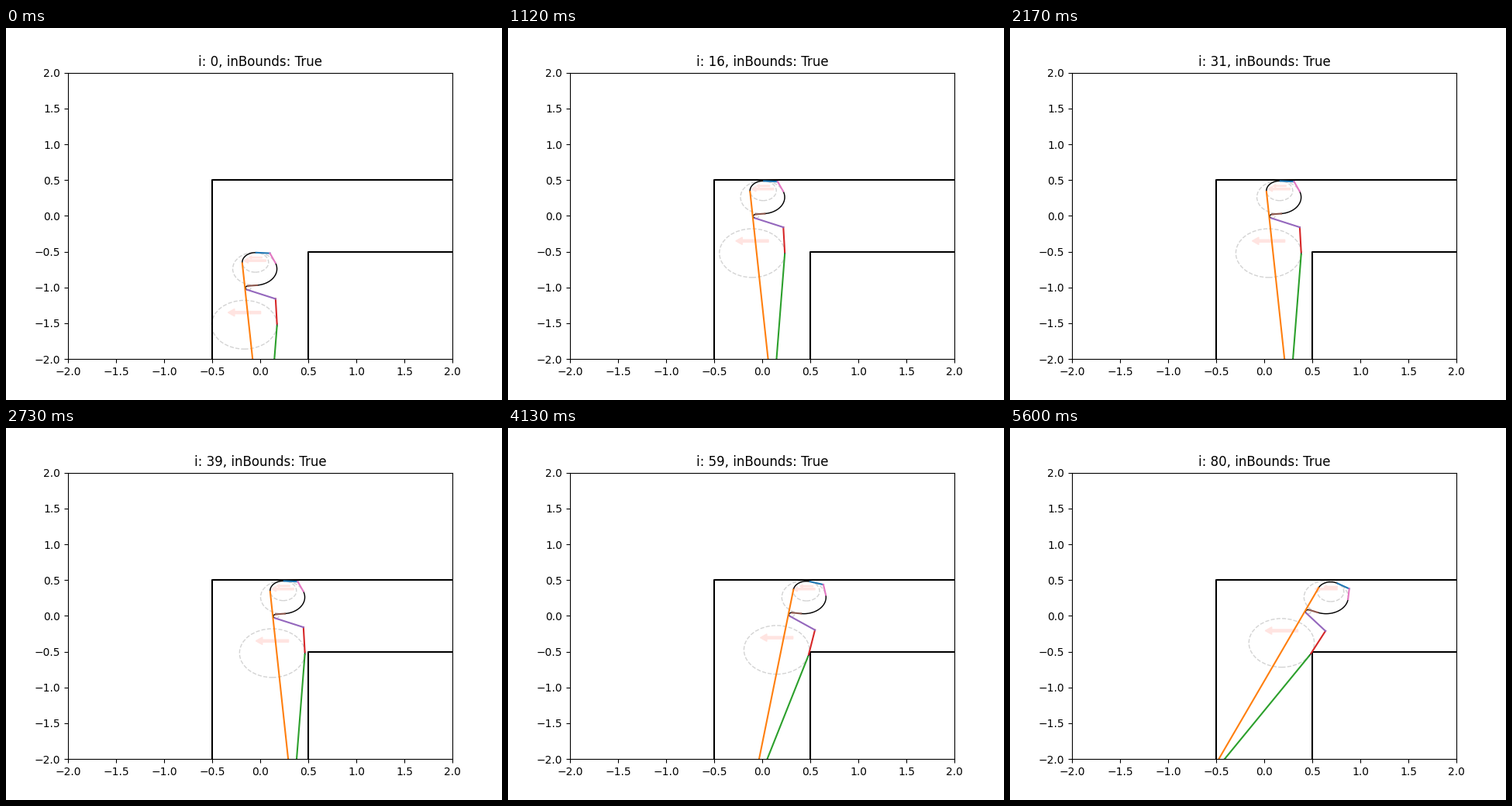
Animation, 640 px wide and 480 px high, one loop 5.67 s. Source, as a matplotlib script:

```python
import numpy as np
import matplotlib.pyplot as plt
from matplotlib.animation import FuncAnimation
from matplotlib.patches import Circle, Polygon

FRAMES, INTERVAL = 81, 70
CORNER = np.array([0.5, -0.5])

# Body geometry at the start pose; the body turns about HEAD.
HEAD, HEAD_R = np.array([-0.056, -0.74]), 0.23
CAP, CAP_R = np.array([-0.05, -0.65]), 0.137
NOTCH, NOTCH_R = np.array([-0.125, -1.006]), 0.028
BASE, BASE_R = np.array([-0.165, -1.52]), 0.34
TOP_TIP = np.array([0.101, -0.522])
SIDE_TIP = np.array([0.16, -1.159])


def on_circle(center, r, deg):
    a = np.radians(deg)
    return center + r * np.stack([np.cos(a), np.sin(a)], axis=-1)


def arc(center, r, start, end):
    return on_circle(center, r, np.linspace(start, end, 60))


def pose(i):
    """Pivot position and clockwise turn at step i."""
    pivot = HEAD + [0.01 * max(i - 10, 0), 0.1 * min(i, 10)]
    if i <= 10:
        return pivot, 0.0
    dx, dy = CORNER - pivot
    # smallest turn, in steps of 0.01, that clears the inner corner
    need = np.arcsin(0.2305 / np.hypot(dx, dy)) - np.arctan2(dx, -dy)
    return pivot, max(0.0, np.ceil(need * 100) / 100)


def place(points, pivot, turn):
    c, s = np.cos(turn), np.sin(turn)
    return (points - HEAD) @ np.array([[c, -s], [s, c]]) + pivot


def arrow(center, r):
    """Left-pointing arrow in the upper half of a circle."""
    x = np.array([0, 0, 0.8, 0.8, 1, 0.8, 0.8])
    y = np.array([0.1, -0.1, -0.1, -0.3, 0, 0.3, 0.1])
    return center + np.column_stack([r / 2 - r * x, r / 2 + r / 2 * y])


CAP_LEFT = on_circle(CAP, CAP_R, 184.6)
BASE_RIGHT = on_circle(BASE, BASE_R, -3.35)
edges = [
    [on_circle(CAP, CAP_R, 87), TOP_TIP],
    [CAP_LEFT, CAP_LEFT + 4 * np.array([0.0803, -1])],
    [BASE_RIGHT + 3 * np.array([-0.0585, -1]), BASE_RIGHT],
    [on_circle(BASE, BASE_R, 2.5), SIDE_TIP],
    [SIDE_TIP, on_circle(NOTCH, NOTCH_R, 246)],
    [on_circle(NOTCH, NOTCH_R, 96), on_circle(HEAD, HEAD_R, -84.3)],
    [TOP_TIP, on_circle(HEAD, HEAD_R, 21)],
]
edges = [np.array(e) for e in edges]
arcs = [
    arc(CAP, CAP_R, 87, 184.6),
    arc(HEAD, HEAD_R, 21, -84.3),
    arc(NOTCH, NOTCH_R, 96, 246),
    arc(BASE, BASE_R, -3.35, 2.5),
]
circles = [(BASE, BASE_R), (HEAD, HEAD_R), (CAP, CAP_R), (NOTCH, NOTCH_R)]

fig, ax = plt.subplots(figsize=(6.4, 4.8), dpi=100)
ax.set_xlim(-2, 2)
ax.set_ylim(-2, 2)
title = ax.set_title("")

ax.plot([-0.5, -0.5, 2], [-2, 0.5, 0.5], color="black")
ax.plot([0.5, 0.5, 2], [-2, -0.5, -0.5], color="black")

rings, arrows = [], []
for center, r in circles:
    rings.append(ax.add_patch(Circle(center, r, fill=False, ls="--", lw=1,
                                     ec="lightgrey")))
    arrows.append(ax.add_patch(Polygon(arrow(center, r), closed=True, lw=1,
                                       color="mistyrose")))
curves = [ax.plot([], [], color="black", lw=1, zorder=1.5)[0] for _ in arcs]
lines = [ax.plot([], [], color=f"C{k}")[0] for k in range(len(edges))]


def update(i):
    pivot, turn = pose(i)
    for line, pts in zip(curves + lines, arcs + edges):
        line.set_data(*place(pts, pivot, turn).T)
    for ring, arr, (center, r) in zip(rings, arrows, circles):
        c = place(center, pivot, turn)
        ring.center = tuple(c)
        arr.set_xy(arrow(c, r))
    title.set_text(f"i: {i}, inBounds: True")
    return [*curves, *lines, *rings, *arrows, title]


anim = FuncAnimation(fig, update, frames=FRAMES, interval=INTERVAL,
                     repeat=True, repeat_delay=0, blit=False)
plt.show()
```
